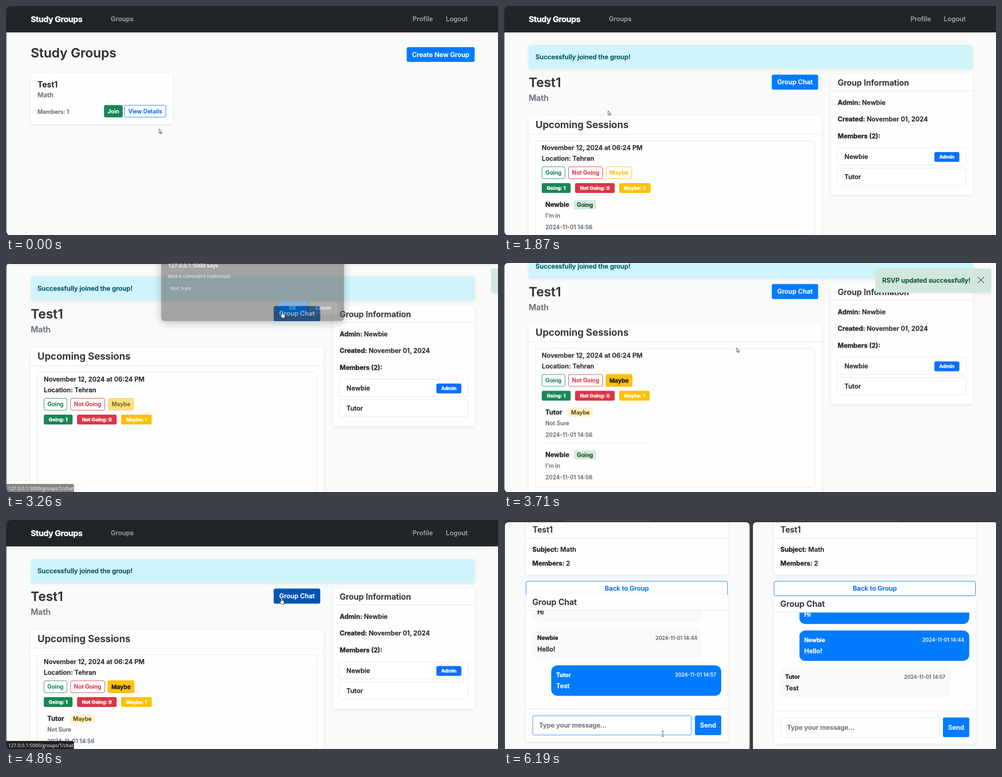
These frames come from a looping animation (1094 px wide and 512 px high, 6.26 s). An HTML page:

```html
<!DOCTYPE html>
<html lang="en">
<head>
<meta charset="utf-8">
<title>Study Groups</title>
<style>
  html, body { margin: 0; width: 100%; height: 100%; overflow: hidden; background: #333436; }
  svg { display: block; width: 100%; height: 100%; }
  text {
    font-family: Inter, sans-serif; font-weight: 600; font-optical-sizing: none;
    white-space: pre; stroke-width: .25px;
  }
  .strong { font-weight: 700; stroke-width: .4px; }
  .system text { font-family: "Open Sans", "Noto Sans", sans-serif; font-weight: 400; stroke-width: .1px; }
  .system .strong { font-weight: 600; stroke-width: .2px; }
  .shadow { filter: drop-shadow(0 2px 3px rgba(0, 0, 0, .09)); }
  .deep { filter: drop-shadow(0 4px 10px rgba(0, 0, 0, .5)); }
  .dialog { transform-origin: 548px 0; }
</style>
</head>
<body>
<svg id="stage" viewBox="0 0 1094 512" preserveAspectRatio="none"></svg>
<script>
const LOOP = 6260;
const HOST = 'Newbie', GUEST = 'Tutor';
const INK = '#212529', DARK = '#333', GRAY = '#6c757d', BLUE = '#007bff', NAVY = '#0056b3',
      LINK = '#0d6efd', GREEN = '#198754', RED = '#dc3545', AMBER = '#ffc107',
      PAGE = '#f9fbfa', EDGE = '#e3e6e9';
const rules = [];
let shown = 0;

// Turns { milliseconds: declarations } into a looping CSS animation.
function track(name, easing, stops) {
  const keys = Object.entries(stops);
  const frames = [...keys, [LOOP, keys[keys.length - 1][1]]]
    .map(([ms, css]) => `${(ms / LOOP * 100).toFixed(3)}% { ${css} }`).join(' ');
  rules.push(`@keyframes ${name} { ${frames} }
    .${name} { animation: ${name} ${LOOP}ms ${easing} infinite; }`);
}

// Markup that is visible only between two times.
function show(from, to, markup) {
  const name = `shown-${shown++}`;
  const stops = { 0: `opacity: ${from ? 0 : 1}` };
  if (from) stops[from] = 'opacity: 1';
  if (to < LOOP) stops[to] = 'opacity: 0';
  track(name, 'step-end', stops);
  return `<g class="${name}">${markup}</g>`;
}

const move = (x, y) => `transform: translate(${x}px, ${y}px)`;
const group = (name, ...parts) => `<g class="${name}">${parts.join('')}</g>`;
const rect = (x, y, w, h, fill, r = 0, more = '') =>
  `<rect x="${x}" y="${y}" width="${w}" height="${h}" rx="${r}" fill="${fill}" ${more}/>`;
const outline = (x, y, w, h, stroke, fill = '#fff', r = 3.5) =>
  rect(x + .5, y + .5, w - 1, h - 1, fill, r, `stroke="${stroke}"`);
const rule = (x, y, w) => rect(x, y, w, 1, EDGE);
const card = (x, y, w, h) => rect(x, y, w, h, '#fefefe', 5, 'class="shadow"');
// y is the middle of the capitals
const text = (x, y, content, size = 14.4, fill = INK, more = '') =>
  `<text x="${x}" y="${(y + size * .364).toFixed(2)}" font-size="${size}" fill="${fill}" stroke="${fill}" ${more}>${content}</text>`;
const strong = (x, y, content, size, fill) => text(x, y, content, size, fill, 'class="strong"');
const label = (key, value) => `<tspan class="strong">${key}</tspan> ${value}`;
const centered = (x, y, content, size, fill) => text(x, y, content, size, fill, 'text-anchor="middle"');
const centeredStrong = (x, y, content, size, fill) =>
  text(x, y, content, size, fill, 'class="strong" text-anchor="middle"');
const button = (x, y, w, h, content, fill, size = 14.4, color = '#fff') =>
  rect(x, y, w, h, fill, 3.5) + centered(x + w / 2, y + h / 2, content, size, color);
const outlined = (x, y, w, h, content, color, size = 12.6) =>
  outline(x, y, w, h, color) + centered(x + w / 2, y + h / 2, content, size, color);
const pill = (x, y, w, content, fill) =>
  rect(x, y, w, 22, fill, 3.5) + centeredStrong(x + w / 2, y + 11, content, 10.8, '#fff');

function typing(x, y, word, size, fill, start, step, end) {
  return [...word].map((_, i) => {
    const from = start + i * step;
    const to = i + 1 < word.length ? from + step : end;
    return show(from, to, text(x, y, word.slice(0, i + 1), size, fill));
  }).join('');
}

const navbar = () => group('',
  rect(0, 0, 1094, 59, INK, 0, 'class="shadow"'),
  text(55, 29, 'Study Groups', 18, '#fff', 'class="strong" letter-spacing="-.45"'),
  text(233, 29, 'Groups', 14.4, '#97999b'),
  text(904, 29, 'Profile', 14.4, '#97999b'),
  text(978, 29, 'Logout', 14.4, '#97999b'));

const groupList = () => group('',
  text(55, 105, 'Study Groups', 28.8, DARK),
  button(891, 92, 151, 33, 'Create New Group', BLUE),
  group('list-lift',
    card(55, 151, 316, 113),
    text(70, 175, 'Test1', 18),
    text(70, 199, 'Math', 14.4, GRAY),
    text(70, 236, 'Members: 1', 12.6, GRAY),
    button(218, 221.5, 41.5, 27.5, 'Join', GREEN, 12.6),
    show(640, 1350, button(218, 221.5, 41.5, 27.5, 'Join', '#157347', 12.6)),
    show(1010, 1210, button(218, 221.5, 41.5, 27.5, 'Join', '#146c43', 12.6)),
    outlined(263, 221.5, 93, 27.5, 'View Details', LINK)));

const reply = (y, name, x, w, answer, fill, color, comment) =>
  strong(92, y, name) + button(x, y - 10.5, w, 21, answer, fill, 12.6, color) +
  text(92, y + 24, comment, 12.6, GRAY) + text(92, y + 50, '2024-11-01 14:56', 12.6, GRAY);
const hostReply = y => reply(y, HOST, 155, 50, 'Going', '#d4edda', '#0f3d26', "I'm in");

const sessionBox = height =>
  card(55, 246, 651, height) + rule(55, 286, 651) + outline(69, 301, 623, height - 22 - 55, EDGE, '#fefefe', 5);

const sessions = () => group('session-lift',
  show(1350, 3190, sessionBox(303)),
  show(3190, 4930, sessionBox(388)),
  text(70, 265, 'Upcoming Sessions', 21.6, DARK),
  text(84, 317, 'November 12, 2024 at 06:24 PM'),
  text(84, 341, 'Location: Tehran'),
  outlined(84, 359, 52, 27.5, 'Going', GREEN),
  outlined(143, 359, 77, 27.5, 'Not Going', RED),
  show(1350, 2300, outlined(227, 359, 57.5, 27.5, 'Maybe', AMBER)),
  show(2300, 3190, button(227, 359, 57.5, 27.5, 'Maybe', AMBER, 12.6, '#000')),
  show(3190, 3400, outline(227, 359, 57.5, 27.5, '#efcb62', '#ffe083') +
    centered(255.7, 372.7, 'Maybe', 12.6, '#806519')),
  show(3400, 4930, button(226, 358.5, 59.5, 28.5, 'Maybe', AMBER, 13.1, '#000')),
  pill(84, 396, 64, 'Going: 1', GREEN),
  pill(158, 396, 88, 'Not Going: 0', RED),
  show(1350, 3190, pill(256, 396, 70, 'Maybe: 0', AMBER)),
  show(3190, 4930, pill(256, 396, 68, 'Maybe: 1', AMBER)),
  show(1350, 3190, hostReply(444) + rule(84, 512, 245)),
  show(3330, 4930, reply(444, GUEST, 142, 55.5, 'Maybe', '#fff3cd', '#664d03', 'Not Sure') +
    rule(84, 512, 240) + hostReply(539)));

const info = () => group('',
  card(727, 153, 315, 269),
  text(742, 171, 'Group Information', 18, DARK),
  rule(727, 189, 315),
  text(742, 216, label('Admin:', HOST)),
  text(742, 253, label('Created:', 'November 01, 2024')),
  strong(742, 291, 'Members (2):'),
  outline(741, 316.5, 287, 39.5, EDGE),
  text(757, 337, HOST),
  pill(957, 326.5, 55.5, 'Admin', LINK),
  outline(741, 362, 287, 39.5, EDGE),
  text(757, 382, GUEST));

const chatButton = fill => button(595.5, 153.5, 103, 33.5, 'Group Chat', fill);
const groupPage = () => group('arrive',
  rect(55, 87.5, 987, 52.5, '#cff4fc', 4, 'class="shadow"'),
  text(70, 114, 'Successfully joined the group!', 14.4, '#055160'),
  text(55, 171, 'Test1', 28.8, DARK),
  text(55, 205, 'Math', 18, GRAY),
  chatButton(BLUE),
  show(3190, 3440, chatButton(NAVY)),
  show(4740, 4930, chatButton(NAVY)),
  sessions(), info());

const toast = () => group('toast',
  rect(826, 12.5, 257, 53.5, '#d1e7dd', 4, 'class="shadow"'),
  text(841, 39, 'RSVP updated successfully!', 14.4, '#0f5132'),
  '<path d="M1053.5 31l14 14m0-14l-14 14" stroke="#5d6863" stroke-width="1.7"/>');

const dialog = () => group('dialog system',
  rect(347, -10, 402.5, 150.5, '#4a4a4a', 8, 'class="deep"'),
  strong(362, 17, '127.0.0.1:5000 says', 12.1, '#fff'),
  text(361.5, 41.5, 'Add a comment (optional):', 11.3, '#f2f2f2'),
  group('field', rect(362.5, 56.5, 372, 23.5, '#444', 1, 'stroke="#a0a0a0" stroke-width="2"')),
  show(2380, 2580, rect(368.5, 61, 1, 13, '#ddd')),
  typing(367, 68, 'Not Sure', 11.3, '#f2f2f2', 2580, 55, 3400),
  rect(605.5, 97, 61.5, 29, '#0067c0', 3),
  centeredStrong(636, 111.5, 'OK', 10.8, '#fff'),
  rect(673, 97, 62, 29, '#5d5d5d', 3),
  centeredStrong(704, 111.5, 'Cancel', 10.8, '#fff'));

const statusBar = () => group('status system',
  rect(-5, 494, 156, 25, '#202124', 4),
  text(5, 504, '127.0.0.1:5000/groups/1/chat', 10.6, '#eee'));

const browser = () => show(0, 4930,
  rect(0, 0, 1094, 512, '#333436') +
  '<clipPath id="viewport"><rect x="1" y="0" width="1110" height="512.5" rx="8"/></clipPath>' +
  `<g clip-path="url(#viewport)">${rect(0, 0, 1094, 512, PAGE)}${group('scroll',
    navbar(), show(0, 1350, groupList()), groupPage())}${toast()}${dialog()}${statusBar()}</g>`);

function bubble(y, name, time, content, mine) {
  const x = mine ? 105 : 63;
  return rect(x, y, 378, 68, mine ? BLUE : '#f8f9fa', 14) +
    strong(x + 11, y + 21, name, 12.6, mine ? '#fff' : INK) +
    text(x + 367, y + 21, `2024-11-01 ${time}`, 11.1, mine ? '#d9ebff' : GRAY, 'text-anchor="end"') +
    text(x + 11, y + 46, content, 14.4, mine ? '#fff' : INK);
}

function chatWindow(dx, drop, guestView, sentAt) {
  const scroll = `messages-${sentAt}`;
  track(scroll, 'step-end', { 0: move(0, 0), [sentAt]: move(0, -56) });
  const field = guestView
    ? rect(62, 435.5, 356.5, 47, '#bfdcff', 6) + outline(64, 437.5, 352.5, 43, '#86b7fe')
    : outline(63, 437, 354, 45, EDGE, '#fefefe', 4);
  const placeholder = text(78, 459, 'Type your message...', 14.4, GRAY);
  const input = guestView
    ? show(4930, 5130, placeholder) +
      typing(78, 459, 'Test', 14.4, INK, 5130, 50, sentAt) +
      show(sentAt, LOOP, placeholder) +
      show(5660, 6190, rect(78, 450, 1, 18, INK))
    : placeholder;
  return `<g transform="translate(${dx} 0)">
    ${rect(2, 5, 544, 520, PAGE, 8)}
    <g clip-path="url(#window)">${card(49, -40, 448.5, 162.5)}</g>
    ${text(63.5, 21, 'Test1', 18, DARK)}${rule(49, 39.5, 448.5)}
    ${text(63, 66, label('Subject:', 'Math'))}${text(63, 96.5, label('Members:', '2'))}
    ${outline(48.5, 136.5, 449, 33.5, LINK, '#fdfefe')}${centered(273, 153, 'Back to Group', 14.4, LINK)}
    <g transform="translate(0 ${drop})">
      ${card(49, 165.5, 448.5, 330)}
      ${text(63, 183, 'Group Chat', 18, DARK)}${rule(49, 201, 448.5)}
      <g clip-path="url(#messages)">${group(scroll,
        bubble(216, HOST, '14:44', 'Hi', !guestView),
        bubble(298.5, HOST, '14:44', 'Hello!', !guestView),
        show(sentAt, LOOP, bubble(381, GUEST, '14:57', 'Test', guestView)))}</g>
      ${rule(49, 421.5, 448.5)}${field}${input}
      ${button(424.5, 437, 58.5, 44, 'Send', BLUE)}
    </g></g>`;
}

const splitView = () => show(4930, LOOP,
  `<clipPath id="window">${rect(2, 5, 544, 520, '#000', 8)}</clipPath>
   <clipPath id="messages">${rect(49, 202, 448, 219.5, '#000')}</clipPath>` +
  rect(0, 0, 1094, 512, '#3a3738') + rect(547.5, 0, 1, 512, '#5b5859') +
  rect(133, 0, 199, 1, '#5b5859') + rect(650, 0, 233, 1, '#5b5859') +
  chatWindow(0, 0, true, 5330) + chatWindow(551.5, 4.5, false, 5400));

function pointer() {
  const shape = d => `<path d="${d}" fill="#fff" stroke="#222" stroke-width=".9" stroke-linejoin="round"/>`;
  const arrow = shape('M0 0V9.5L2.2 7.6 3.7 11 5.2 10.3 3.8 7H6.4Z');
  const hand = shape('M-1.3 7V1.2a1.3 1.3 0 0 1 2.6 0V5l3.2.8q1.4.4 1.2 2L5 11v2.5H-.6L-4 8.5q0-1.8 1.6-1Z');
  const beam = '<path d="M-2.5 0h2q.5 0 .5.5q0-.5.5-.5h2M0 .5v11M-2.5 12h2q.5 0 .5-.5q0 .5.5.5h2" fill="none" stroke="#333"/>';
  return group('pointer',
    show(0, 640, arrow), show(640, 1350, hand), show(1350, 2280, arrow),
    show(2280, 2620, hand), show(2620, 3190, arrow), show(3190, 3440, hand),
    show(3440, 4740, arrow), show(4740, 5000, hand), show(5000, LOOP, beam));
}

const lifted = move(0, -4), still = move(0, 0);
track('list-lift', 'ease', { 0: still, 290: still, 490: lifted });
track('session-lift', 'ease', {
  0: still, 2060: still, 2260: lifted, 3060: lifted, 3240: still,
  3560: still, 3760: lifted, 4620: lifted, 4800: still });
track('arrive', 'ease-out', { 0: 'opacity: 0', 1350: 'opacity: 0', 1620: 'opacity: 1' });
track('scroll', 'ease-in-out', {
  0: still, 1880: still, 2260: move(0, -57), 3420: move(0, -57),
  3860: move(0, -122), 4460: move(0, -122), 4720: still });
track('toast', 'ease-in-out', {
  0: move(275, 0), 3190: move(275, 0), 3550: still + '; opacity: 1',
  4460: still + '; opacity: 1', 4600: still + '; opacity: 0' });
const away = 'transform: translateY(-24px) scale(1.02); opacity: 0';
const open = 'transform: translateY(0) scale(1); opacity: 1';
track('dialog', 'linear', { 0: away, 2370: away, 2490: open, 3190: open, 3330: away });
track('field', 'linear', { 0: 'opacity: 1', 3190: 'opacity: 1', 3250: 'opacity: .1' });
track('status', 'linear', {
  0: 'opacity: 0', 3190: 'opacity: 0', 3320: 'opacity: 1', 3480: 'opacity: 1',
  3620: 'opacity: 0', 4740: 'opacity: 0', 4840: 'opacity: 1' });
track('pointer', 'ease-in-out', {
  0: move(340.5, 275), 230: move(340.5, 275), 820: move(231.5, 234), 1870: move(231.5, 234),
  2380: move(279.5, 300), 2560: move(279.5, 300), 3060: move(614.5, 109.5), 3400: move(614.5, 109.5),
  4000: move(432, 260), 4460: move(432, 260), 4820: move(613, 175), 4930: move(613, 175),
  5080: move(353, 472) });

const scene = browser() + splitView() + pointer();
document.head.appendChild(document.createElement('style')).textContent = rules.join('\n');
document.getElementById('stage').innerHTML = scene;
</script>
</body>
</html>
```
